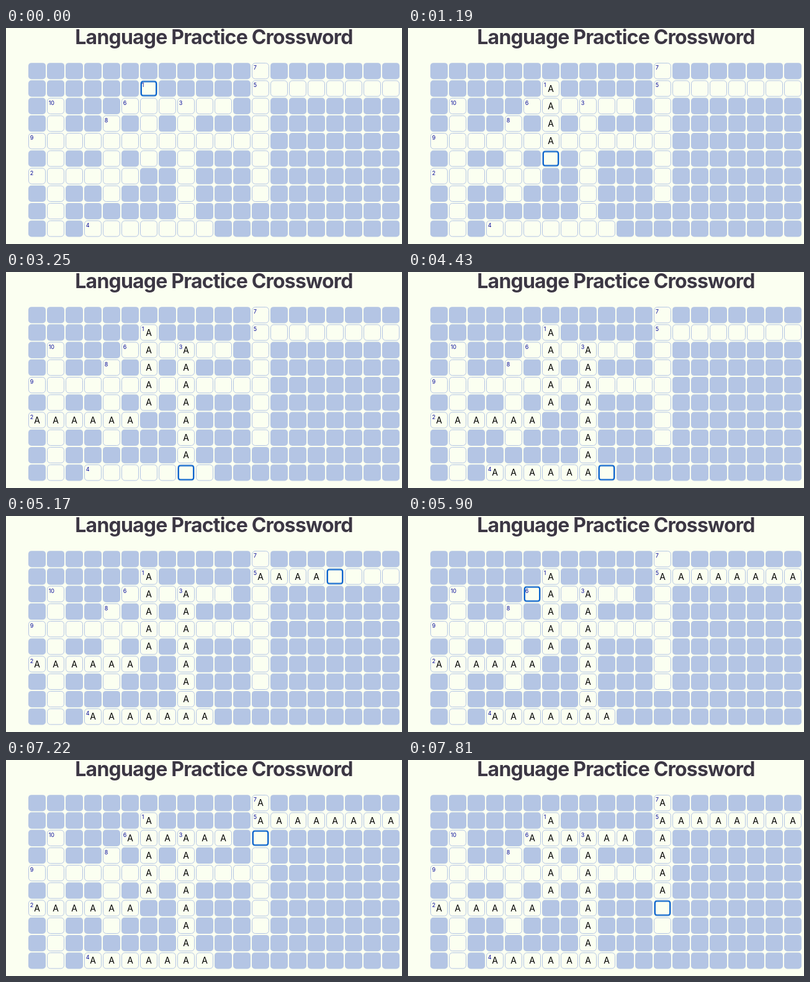
These frames come from a looping animation (638 px wide and 348 px high, 8 s). An HTML page:

```html
<!DOCTYPE html>
<html lang="en">
<head>
<meta charset="utf-8">
<title>Language Practice Crossword</title>
<style>
  html, body { margin: 0; width: 100%; height: 100%; overflow: hidden; background: #fbfff1; }
  svg { display: block; font-family: Inter, sans-serif; }
  .title { font-size: 32px; font-weight: 700; letter-spacing: -0.025em; fill: #3c3744; text-anchor: middle; }
  .block { fill: #b4c5e4; }
  .open { fill: #fbfff1; stroke: #b4c5e4; }
  .number { font-size: 9px; fill: #090c9b; }
  .letter { font-size: 14px; fill: #000; text-anchor: middle; }
  .ring { fill: none; stroke: #005fcc; stroke-width: 2; }
</style>
</head>
<body>
<svg id="stage" width="638" height="348" viewBox="0 0 638 348"></svg>
<script>
const LOOP = 8000, ROWS = 10, COLS = 20;
const CELL_W = 28, CELL_H = 26.3;

// Word n is entry n - 1: row, column, length, direction
const words = [
  [1, 6, 5, 'down'], [6, 0, 6, 'across'], [2, 8, 8, 'down'], [9, 3, 7, 'across'],
  [1, 12, 8, 'across'], [2, 5, 6, 'across'], [0, 12, 8, 'down'],
  [3, 4, 5, 'down'], [4, 0, 13, 'across'], [2, 1, 8, 'down'],
];

// Runs of evenly spaced keystrokes: first time, last time, count
const runs = [
  [740, 1780, 8], [1930, 2960, 8], [3110, 3840, 6], [4140, 5170, 8],
  [5310, 5600, 3], [5900, 6490, 5], [6640, 6780, 2], [7080, 7810, 6],
];

const stage = document.getElementById('stage');
const centerX = col => 50 + 30 * col;
const centerY = row => 69.3 + 28.22 * row;

function add(tag, className, attrs, text = '') {
  const el = document.createElementNS('http://www.w3.org/2000/svg', tag);
  el.setAttribute('class', className);
  for (const name in attrs) el.setAttribute(name, attrs[name]);
  el.textContent = text;
  return stage.appendChild(el);
}

// Rounded box inside a cell, shrunk by an inset on every side
function addBox(className, x, y, inset, rx) {
  const width = CELL_W - 2 * inset, height = CELL_H - 2 * inset;
  return add('rect', className, { x: x - width / 2, y: y - height / 2, width, height, rx });
}

function play(el, frames) {
  el.animate(frames.map(f => ({ ...f, easing: 'step-end' })),
    { duration: LOOP, iterations: Infinity });
}

const cellsOf = ([row, col, length, dir]) => Array.from({ length }, (_, i) =>
  dir === 'down' ? [row + i, col] : [row, col + i]);

const open = new Set(words.flatMap(cellsOf).map(String));
const path = words.flatMap(cellsOf);
const keyTimes = runs.flatMap(([first, last, count]) =>
  Array.from({ length: count }, (_, i) =>
    Math.floor((first + (last - first) * i / (count - 1)) / 10) * 10));

add('text', 'title', { x: 335, y: 26 }, 'Language Practice Crossword');

for (let row = 0; row < ROWS; row++) {
  for (let col = 0; col < COLS; col++) {
    const isOpen = open.has(String([row, col]));
    addBox(isOpen ? 'open' : 'block', centerX(col), centerY(row), isOpen ? 0.5 : 0, 5);
  }
}

const typed = new Set();
keyTimes.forEach((time, i) => {
  const [row, col] = path[i], key = String([row, col]);
  if (typed.has(key)) return;
  typed.add(key);
  const letter = add('text', 'letter', { x: centerX(col), y: centerY(row) + 5 }, 'A');
  play(letter, [
    { opacity: 0, offset: 0 }, { opacity: 1, offset: time / LOOP }, { opacity: 1, offset: 1 },
  ]);
});

const ring = addBox('ring', 0, 0, 1.9, 3);
const stops = [0, ...keyTimes].map((time, i) => {
  const [row, col] = path[i];
  return { transform: `translate(${centerX(col)}px, ${centerY(row)}px)`, offset: time / LOOP };
});
play(ring, [...stops, { ...stops[stops.length - 1], offset: 1 }]);

words.forEach(([row, col], i) =>
  add('text', 'number', { x: centerX(col) - 11.3, y: centerY(row) - 2.1 }, i + 1));
</script>
</body>
</html>
```
